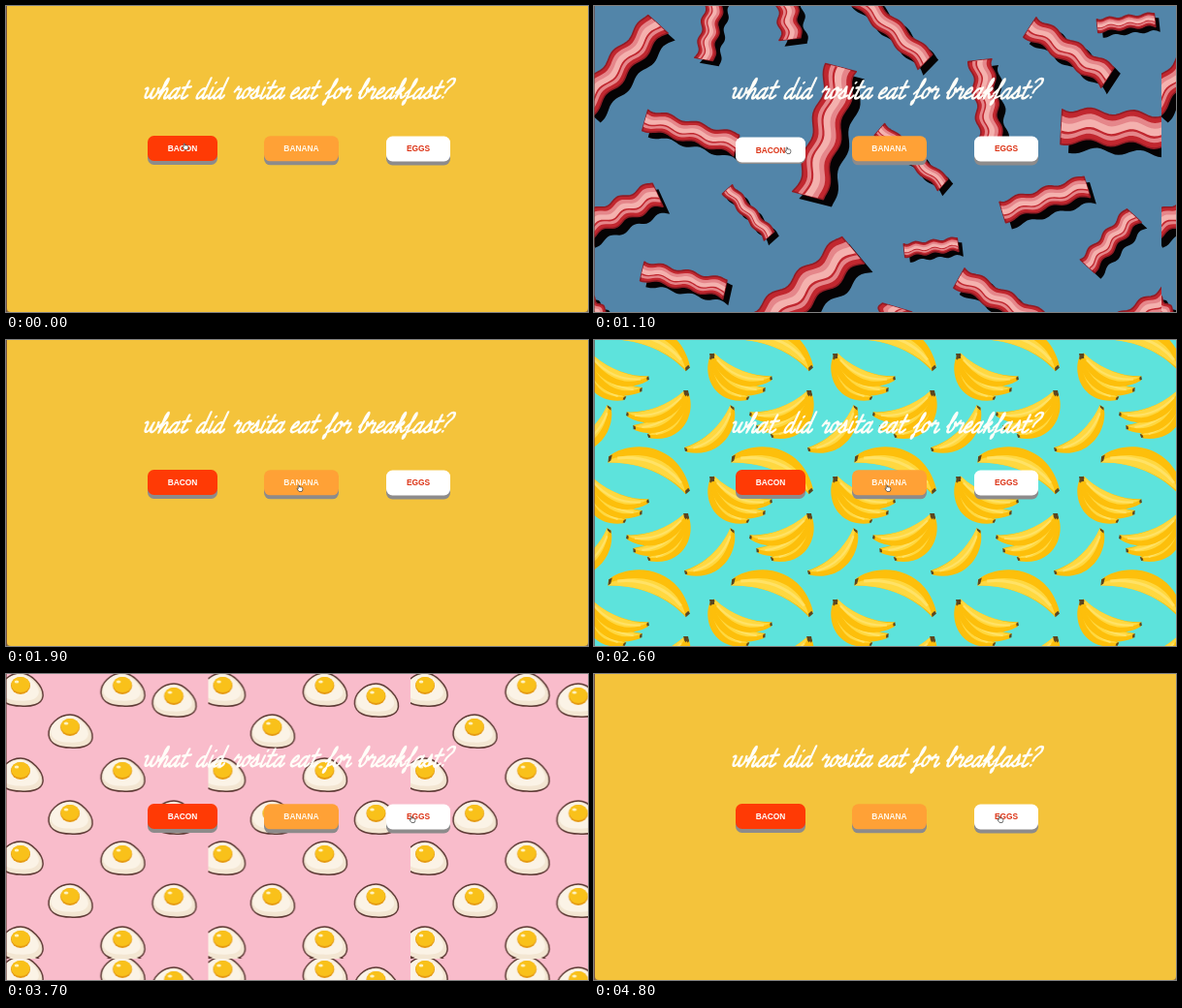
These frames come from a looping animation (600 by 316 pixels, 4900 ms). An HTML page:

```html
<!DOCTYPE html>
<html lang="en">
<head>
<meta charset="utf-8">
<title>Breakfast</title>
<style>
  html, body { margin: 0; width: 100%; height: 100%; overflow: hidden; background: #8d7046; }
  svg { display: block; width: 600px; height: 316px; }
  text { font: bold 8.4px "Liberation Sans", Arial, sans-serif; text-anchor: middle; }
</style>
</head>
<body>
<svg id="stage" viewBox="0 0 600 316" xmlns="http://www.w3.org/2000/svg"></svg>
<script>
const LOOP = 4900, STEP = 100;
const stage = document.getElementById('stage');

function add(parent, tag, attrs = {}, text) {
  const el = document.createElementNS('http://www.w3.org/2000/svg', tag);
  for (const key in attrs) el.setAttribute(key, attrs[key]);
  if (text) el.textContent = text;
  return parent.appendChild(el);
}
const defs = add(stage, 'defs');
const tile = (id, width, height) =>
  add(defs, 'pattern', { id, width, height, patternUnits: 'userSpaceOnUse' });
const fillStage = (parent, fill) => add(parent, 'rect', { width: 600, height: 316, fill });

// Plain yellow page
add(stage, 'rect', { x: 1, y: -10, width: 599, height: 326, rx: 4, fill: '#f4c33b' });

// Bacon: wavy bands with square ends, stacked across the strip
function band([x1, y1, x2, y2, width], low, high) {
  const dx = x2 - x1, dy = y2 - y1, length = Math.hypot(dx, dy);
  const edge = offset => Array.from({ length: 37 }, (_, i) => {
    const t = i / 36, flare = 1 + 0.12 * Math.abs(2 * t - 1) ** 8;
    const side = width * (offset * flare + 0.09 * Math.sin(t * 6 * Math.PI + 0.6)) / length;
    return (x1 + dx * t - dy * side).toFixed(1) + ' ' + (y1 + dy * t + dx * side).toFixed(1);
  });
  return 'M' + [...edge(low), ...edge(high).reverse()].join('L') + 'Z';
}
function ribbon(parent, strip) {
  const depth = 3 + strip[4] * 0.15;
  const paint = (low, high, fill, extra = {}) =>
    add(parent, 'path', { d: band(strip, low, high), fill, ...extra });
  paint(-0.5, 0.5, '#050304', { transform: `translate(${depth} ${depth})` });
  paint(-0.47, 0.47, '#c1272f', { stroke: '#911b24', 'stroke-width': 1.6, 'stroke-linejoin': 'round' });
  paint(-0.3, 0.3, '#e5868a');
  paint(-0.13, 0.13, '#f4b1ae');
  paint(0.1, 0.17, '#c1272f');
}
const strips = [
  [-12, 103, 65, 18, 26], [125, -8, 114, 55, 18], [195, -30, 203, 34, 21],
  [268, -14, 342, 57, 20], [450, 21, 530, 73, 23], [519, 20, 578, 14, 13],
  [256, 64, 222, 196, 31], [399, 56, 409, 138, 23], [53, 117, 147, 143, 21],
  [482, 123, 615, 130, 34], [295, 127, 360, 184, 15], [-12, 229, 65, 194, 25],
  [138, 189, 181, 237, 13], [421, 212, 508, 186, 21], [508, 268, 556, 216, 19],
  [320, 252, 375, 246, 13], [50, 273, 135, 292, 19], [172, 330, 266, 251, 34],
  [377, 280, 462, 328, 22], [298, 355, 311, 311, 30], [530, 338, 604, 294, 24],
  [-14, 300, 16, 330, 18]
];
const bacon = add(stage, 'g');
const baconTile = tile('bacon', 585, 400);
add(baconTile, 'rect', { width: 585, height: 400, fill: '#5285a9' });
strips.forEach(strip => ribbon(baconTile, strip));
fillStage(bacon, 'url(#bacon)');

// Banana: a crescent between two points; bend -1 or 1 picks the outer side
function fruit(parent, x1, y1, x2, y2, bend, fat = 1) {
  const length = Math.hypot(x2 - x1, y2 - y1) / 100;
  const angle = Math.atan2(y2 - y1, x2 - x1) * 180 / Math.PI;
  const g = add(parent, 'g', {
    transform: `translate(${x1} ${y1}) rotate(${angle}) scale(${length} ${-bend * length * fat})`
  });
  add(g, 'path', { d: 'M0-3C14-27 66-46 100-5L98 2C72-9 36-11 2 3Z', fill: '#fdbf0b' });
  add(g, 'path', { d: 'M2 0C24-19 68-33 97 0C72-9 36-11 2 3Z', fill: '#ffd840' });
  add(g, 'path', { d: 'M10-5C34-17 62-19 88-7', fill: 'none', stroke: '#ffe266', 'stroke-width': 3 });
  add(g, 'path', { d: 'M0-3L3-6L4 0L2 3Z M98-5L101-3L98 2L96-1Z', fill: '#5b4620' });
}
const banana = add(stage, 'g');
fillStage(banana, '#5de3dc');
const bunch = add(defs, 'g', { id: 'bunch' });
fruit(bunch, 14, 123, 97, 158, -1, 1.1);
fruit(bunch, 96, 181, 55, 226, -1, 1.2);
fruit(bunch, 96, 181, 40, 217, -1, 1.1);
fruit(bunch, 95, 181, 33, 203, -1);
fruit(bunch, 143, 195, 93, 240, -1, 1.1);
fruit(bunch, 121, 143, 160, 187, 1, 1.2);
fruit(bunch, 121, 143, 177, 178, 1, 1.1);
fruit(bunch, 122, 142, 184, 166, 1);
add(bunch, 'path', { d: 'M92 179h5l1 5h-4z M119 141h5l0 5h-4z', fill: '#5b4620' });
for (let row = -2; row < 3; row++)
  for (let col = -2; col < 5; col++)
    add(banana, 'use', { href: '#bunch', x: col * 127, y: row * 127 });

// Eggs: a tile cut hard at its edges
const eggs = add(stage, 'g');
const eggTile = tile('eggs', 208.5, 293);
add(eggTile, 'rect', { width: 209, height: 293, fill: '#f9bccb' });
const shell = 'M-22 4C-23-6-12-17 0-17C11-17 24-3 23 7C22 16 10 18 0 17C-10 17-21 14-22 4Z';
function egg(x, y) {
  const g = add(eggTile, 'g', { transform: `translate(${x} ${y})` });
  add(g, 'path', { d: shell, fill: '#f3e6d2', stroke: '#5d3934', 'stroke-width': 1.5 });
  add(g, 'path', { d: shell, fill: '#fbf3e6', transform: 'translate(-1 -2) scale(.86 .8)' });
  add(g, 'ellipse', { cx: 0, cy: -4, rx: 10, ry: 9, fill: '#e59a12' });
  add(g, 'ellipse', { cx: 0, cy: -5, rx: 9.5, ry: 8, fill: '#f9c11a' });
  add(g, 'ellipse', { cx: -4, cy: -8, rx: 2.3, ry: 1.6, fill: '#fff3c0' });
}
[16, 104, 190, 278].forEach(y => { egg(15, y); egg(120, y); });
[59, 148, 234].forEach(y => egg(66, y));
[27, 148, 234].forEach(y => egg(173, y));
fillStage(eggs, 'url(#eggs)');

// Brush lettering: pen strokes on a baseline, [advance, path]
const tall = 'M0-6Q5-13 4.5-19Q3.5-23 2.5-17';
const bowl = 'Q5-12 2.5-8Q0-3 1.5-.5Q4 1.5 7-5';
const glyphs = {
  w: [15, 'M0-10C2-12 3-10 2.5-6C2 0 5 1 7-3L8.5-10C7-2 9 1 11.5-1C14-3 14-8 13-10.5'],
  h: [11, tall + 'L2 0Q3.5-9 6-10.5Q8.5-10 7.5-4Q7 0 8.5 0Q10 0 11-3'],
  a: [11, 'M8-9' + bowl + 'L8-11Q6.5-2 7.5-.5Q9 1 11-3'],
  t: [8, 'M4-18L2.5-4Q2 0 4 0Q6 0 8-3M0-11L8-12'],
  d: [11, 'M7.5-9' + bowl + 'L8-21L7-4Q7 0 8.5 0Q10 0 11-3'],
  i: [6, 'M2.5-11L2-3Q2 0 3.5 0Q5 0 6.5-3M3.5-16l.3-.5'],
  e: [8, 'M1-4Q6-6 6-9Q5.5-12.5 3-10Q0-6 1-2Q3 2 8-3'],
  f: [8, 'M0-5Q6-12 6-18Q5-23 4-16L2.5 5Q1 8 1 3Q3-1 8-3'],
  o: [9, 'M4.5-11Q0-9 1-2.5Q3 2 6-3Q8-10 4.5-11Q5-7.5 9.5-9'],
  r: [8.5, 'M0-7L2-12Q1.5-8.5 4-9.5Q6.5-11 5.5-6Q4.5 0 6 0Q7.5 0 9-3'],
  b: [9, tall + 'Q1-3 2-1Q4 1.5 6.5-3Q8-8 6.5-10.5Q6-7 9.5-9'],
  k: [10, tall + 'L2 0Q3-8 6-11Q8-9 3.5-6Q6-5 6.5-2Q7.5 1 10.5-3'],
  s: [8.5, 'M0-3Q4-8 4.5-12Q6.5-5 5.5-2Q3.5 1.5 1-1.5M5.5-1L9-3'],
  '?': [9, 'M2-17Q4-22 8-20Q10-16 6-12Q3.5-9 3.5-6M3-1l.1-.4']
};
const words = { what: 140, did: 195, rosita: 233, eat: 292, for: 328, 'breakfast?': 362 };
const question = add(stage, 'g', {
  fill: 'none', stroke: '#fffef8', 'stroke-width': 2.4, role: 'img',
  'stroke-linecap': 'round', 'stroke-linejoin': 'round'
});
add(question, 'title', {}, Object.keys(words).join(' '));
for (const word in words) {
  let x = words[word];
  for (const letter of word) {
    const [advance, d] = glyphs[letter];
    add(question, 'path', { d, transform: `translate(${x} 95.5) skewX(-22)` });
    x += advance + 0.3;
  }
}

// Buttons
function button(label, x, y, width, fill, ink) {
  const shape = { x, width, height: 26, rx: 6.5 };
  const shade = add(stage, 'rect', { ...shape, y: y + 4, fill: '#8d8b8b' });
  const face = add(stage, 'rect', { ...shape, y, fill });
  const text = add(stage, 'text', { x: x + width / 2, y: 150, fill: ink }, label);
  return { shade, face, text };
}
const baconButton = button('BACON', 146, 134, 72, '#ff3a05', '#fff');
button('BANANA', 266, 134.3, 77, '#ffa136', '#fff8ec');
button('EGGS', 392, 134.5, 66, '#fff', '#dc3517');

function press(on) {
  const { shade, face, text } = baconButton;
  face.setAttribute('fill', on ? '#fff' : '#ff3a05');
  face.setAttribute('y', on ? 135.5 : 134);
  shade.setAttribute('y', on ? 137 : 138);
  text.setAttribute('fill', on ? '#dc3517' : '#fff');
  text.setAttribute('y', on ? 151.5 : 150);
}

// Window edge and pointer
add(stage, 'rect', { width: 1, height: 316, fill: '#6b4440', opacity: 0.65 });
const pointer = add(stage, 'path', {
  d: 'M-2.2-3.4q.9-1.2 1.6 0V-1.3H1.8q1.7.2 1.7 1.8V2.2L2.6 4.3H-1.2L-3.7 1q.2-1.1 1.5-.3Z',
  fill: '#fff', stroke: '#3a3a3a', 'stroke-width': 0.9
});

const track = [
  [0, 185, 145], [200, 187, 146], [900, 200, 149], [1200, 200, 149], [1800, 303, 153],
  [2800, 303, 153], [3000, 305, 154], [3600, 419, 150], [LOOP, 419, 150]
];
function pointerAt(time) {
  const next = track.findIndex(key => key[0] > time);
  const [t1, x1, y1] = track[next - 1], [t2, x2, y2] = track[next];
  const t = (time - t1) / (t2 - t1), ease = t * t * (3 - 2 * t);
  return [x1 + (x2 - x1) * ease, y1 + (y2 - y1) * ease];
}

const scenes = [[bacon, 200, 1200], [banana, 2000, 3000], [eggs, 3700, 4700]];
function draw(now) {
  const time = Math.floor(now % LOOP / STEP) * STEP;
  for (const [scene, from, to] of scenes)
    scene.setAttribute('display', time >= from && time < to ? 'inline' : 'none');
  press(time >= 200 && time < 1200);
  pointer.setAttribute('transform', `translate(${pointerAt(time).join(' ')}) scale(.8)`);
}

const start = performance.now();
function tick() {
  draw(performance.now() - start);
  requestAnimationFrame(tick);
}
tick();
</script>
</body>
</html>
```
